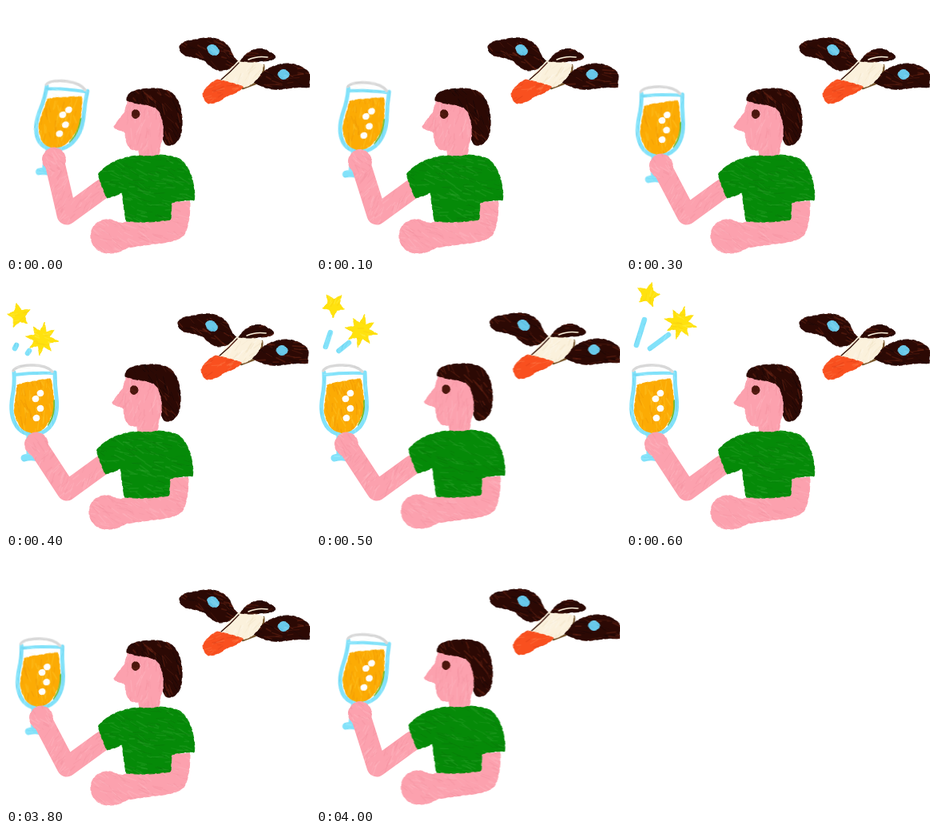
Write an HTML page with a canvas that moves like this. It is 380x310 px and loops after 4100 ms.

```html
<!DOCTYPE html>
<html lang="en">
<head>
<meta charset="utf-8">
<title>Cheers</title>
<style>
html, body { margin: 0; width: 380px; height: 310px; overflow: hidden; background: #fff; }
canvas { display: block; }
</style>
</head>
<body>
<canvas id="stage" width="380" height="310"></canvas>
<script>
const stage = document.getElementById('stage').getContext('2d');
const layerCanvas = Object.assign(document.createElement('canvas'), { width: 400, height: 330 });
const layer = layerCanvas.getContext('2d');

// Paint colours: base, light stroke, dark stroke
const SKIN = ['#fca1ae', '#ffb6c0', '#f4919f'];
const GREEN = ['#058a08', '#27a028', '#047806'];
const BROWN = ['#2c0904', '#7a2814', '#140302'];
const CYAN = ['#82e2fa', '#a8effe', '#66d0ee'];
const BEER = ['#fcab04', '#ffc928', '#ee9400'];
const RED = ['#f9501f', '#ff7a46', '#e23c12'];
const CREAM = ['#fbf1dc', '#fffaf0', '#efe2c4'];
const YELLOW = ['#ffe20e', '#fff04e', '#f8cc0c'];
const WHITE = ['#fff', '#fff', '#f6f4ee'];
const GREY = ['#d8d8d8', '#e8e8e8', '#c6c6c6'];

// Start of each drawing in ms, and how far the glass has been pushed out
const TIMES = [0, 100, 200, 300, 400, 500, 600, 700, 800, 3800, 3900, 4000];
const REACH = [0, .23, .45, .73, 1, 1, 1, .87, .73, .73, .45, .23];
const LOOP = 4100;
const JITTER = [[0, 0], [-2, 0], [.5, -1]];

let seed = 1;
function random() {
  seed = (seed * 16807) % 2147483647;
  return seed / 2147483647;
}

// Fills a shape (or strokes it when width is given) and brushes texture over it
function paint(shape, [base, light, dark], [x, y, w, h], angle = 0, width = 0) {
  const path = typeof shape === 'string' ? new Path2D(shape) : shape;
  layer.clearRect(0, 0, 400, 330);
  layer.save();
  layer.lineCap = layer.lineJoin = 'round';
  layer.fillStyle = layer.strokeStyle = base;
  layer.lineWidth = width || 1;
  if (!width) {
    layer.fill(path);
    layer.setLineDash([4, 3, 7, 5]);
  }
  layer.stroke(path);
  layer.setLineDash([]);
  layer.globalCompositeOperation = 'source-atop';
  layer.globalAlpha = .4;
  for (let i = w * h / 45; i > 0; i--) {
    const px = x + random() * w, py = y + random() * h;
    const a = angle + (random() - .5) * .8, len = 4 + random() * 11;
    layer.strokeStyle = random() < .5 ? light : dark;
    layer.lineWidth = .6 + random() * 1.2;
    layer.beginPath();
    layer.moveTo(px, py);
    layer.lineTo(px + Math.cos(a) * len, py + Math.sin(a) * len);
    layer.stroke();
  }
  layer.restore();
  stage.drawImage(layerCanvas, 0, 0);
}

function oval(x, y, rx, ry = rx, turn = 0) {
  const path = new Path2D();
  path.ellipse(x, y, rx, ry, turn, 0, 7);
  return path;
}

function star(x, y, r, points, turn) {
  const path = new Path2D();
  for (let i = 0; i < points * 2; i++) {
    const a = turn + i * Math.PI / points;
    const d = i % 2 ? r * .48 : r * (i % 4 ? .9 : 1);
    path.lineTo(x + Math.cos(a) * d, y + Math.sin(a) * d);
  }
  path.closePath();
  paint(path, YELLOW, [x - r, y - r, 2 * r, 2 * r], turn);
}

function drawBird() {
  paint('M322 74Q324 83 312 97L296 103', ['#7a5a30', '#94713f', '#5c4020'], [290, 70, 36, 36], 2, 2.5);
  paint('M217 50Q221 43 237 42Q248 39 258 40Q274 42 281 55Q284 65 291 70Q280 81 267 81Q256 78 248 68Q235 64 224 62Q216 58 217 50Z',
    BROWN, [215, 38, 78, 44], .5);
  paint('M310 96Q319 80 338 74Q356 69 369 76Q380 81 380 88L379 102Q364 101 352 103Q336 106 324 102Z',
    BROWN, [308, 70, 72, 36], .2);
  paint('M291 68Q309 67 322 74Q320 87 309 96Q300 104 285 101Q271 98 267 94Q277 81 291 68Z', CREAM, [265, 65, 58, 38], 2.2);
  paint('M291 71Q280 83 269 92', BROWN, [262, 66, 34, 30], 2.2, 1.2);
  paint('M264 92Q281 95 297 101Q290 109 275 113Q265 122 253 122Q246 118 246 109Q252 97 264 92Z', RED, [245, 90, 52, 34], -.4);
  paint('M293 69Q300 57 312 54Q324 52 328 57Q337 60 337 65Q331 69 320 69Q306 71 293 69Z', BROWN, [290, 52, 48, 20], -.2);
  paint('M303 67Q314 62 327 64', CREAM, [302, 60, 28, 10], 0, 1.6);
  const blue = ['#69c9ea', '#91dbf3', '#4bb5dd'];
  paint(oval(259, 55, 8, 6, .6), blue, [249, 45, 20, 18], .6);
  paint(oval(347, 85.5, 7, 6), blue, [338, 77, 18, 16], .3);
}

function drawGlass() {
  const area = [0, 98, 70, 128];
  paint('M30 190L30 218M23 220Q30 218 38 219.5', CYAN, area, 0, 9);
  paint('M12 110Q34 100 58 111L58 128L12 128Z', WHITE, area);
  paint('M14 129Q24 125 36 124Q48 121 56 121Q60 140 60 158Q55 178 41 189L26 189Q13 180 10 160Z', BEER, area, 1.4);
  paint('M61 149Q63 164 54 179', ['#79b92e', '#a4cc3d', '#4f9e35'], area, 1.8, 4);
  paint('M10 113Q11 128 8 143Q4 166 13 180Q18 188 30 191M61 113Q61 128 63 144Q66 168 54 182Q46 190 34 191',
    CYAN, area, 1.5, 5);
  paint('M11 116Q34 113 59 114', CYAN, area, 0, 4);
  paint('M9 111Q12 105 30 104Q50 103 58 112', GREY, area, 0, 3.5);
  for (const [x, y] of [[43, 139], [37, 146], [43, 158], [38, 170]]) paint(oval(x, y, 4), WHITE, area);
}

function drawArm(x, y) {
  const arm = new Path2D(`M${x} ${y}L76 261L120 229`);
  const area = [20, 172, 115, 105];
  paint(arm, SKIN, area, 2.2, 25);
  paint(oval(x, y, 14.5, 15), SKIN, area, .8);
}

function drawPerson() {
  paint('M207 245L206 266L150 270Q142 273 137 269Q127 264 115 270Q105 277 106 290Q109 307 126 309Q140 310 152 302L188 297Q213 295 222 287Q230 275 230 244Z',
    SKIN, [104, 240, 130, 70], .5);
  paint('M153 117L150 126Q149 133 144 138L135 150Q134 153 141 155Q148 156 149 160Q150 173 155 178Q159 181 166 180L166 192L191 192L193 172Q199 164 198 140L190 120Z',
    SKIN, [132, 115, 70, 78], 1.8);
  paint(oval(162, 135, 5, 5.5), ['#4b160d', '#6f281a', '#2d0a06'], [156, 129, 12, 12]);
  paint('M151 118Q150 108 164 105Q190 100 205 107Q218 115 220 140Q221 160 215 168Q210 175 202 174Q195 172 197 162Q198 145 192 133Q188 125 172 123Q160 122 151 118Z',
    BROWN, [148, 100, 74, 76], 1);
  paint('M148 190Q158 187 167 187Q180 189 192 186Q209 187 219 192Q231 204 234 222Q237 236 235 243Q222 242 207 246L206 267Q178 272 150 269Q147 250 145 233Q137 238 126 240Q119 225 115 210Q128 195 148 190Z',
    GREEN, [112, 184, 128, 88], .3);
}

// Spread runs from 0 (just popped) to 1 (fully flown out)
function drawSparks(spread) {
  const mix = (from, to) => from + (to - from) * spread;
  star(mix(16, 28), mix(42, 16), 16, 5, mix(-.5, -1.3));
  star(mix(45, 68), mix(71, 51), 21, 8, mix(.15, .25));
  paint(`M${mix(11, 13)} ${mix(83, 79)}L${mix(13, 23)} ${mix(79, 47)}`, CYAN, [0, 40, 70, 55], 2, 6.5);
  paint(`M${mix(27, 30)} ${mix(89, 83)}L${mix(29, 53)} ${mix(86, 66)}`, CYAN, [0, 40, 70, 55], 2, 6.5);
}

function drawStep(step) {
  const cel = step % 3, reach = REACH[step];
  const handX = 60 - 22 * reach, handY = 192 + 11 * reach;
  const lean = Math.pow(1 - reach, 1.3);
  seed = 77 + cel * 9001;
  stage.fillStyle = '#fff';
  stage.fillRect(0, 0, 380, 310);

  stage.save();
  stage.translate(...JITTER[cel]);
  drawBird();
  stage.restore();

  stage.save();
  stage.translate(handX, handY);
  stage.rotate(.12 * lean);
  stage.transform(1, 0, -.09 * lean, 1, 0, 0);
  stage.translate(-38, -203);
  drawGlass();
  stage.restore();

  drawArm(handX, handY);
  stage.save();
  stage.translate(...JITTER[cel]);
  drawPerson();
  stage.restore();

  if (step >= 4 && step <= 8) drawSparks(Math.min(1, (step - 4) / 2));
}

let shown = -1;
function tick() {
  const time = performance.now() % LOOP;
  const step = TIMES.filter(t => t <= time).length - 1;
  if (step !== shown) drawStep(shown = step);
  requestAnimationFrame(tick);
}
tick();
</script>
</body>
</html>
```
